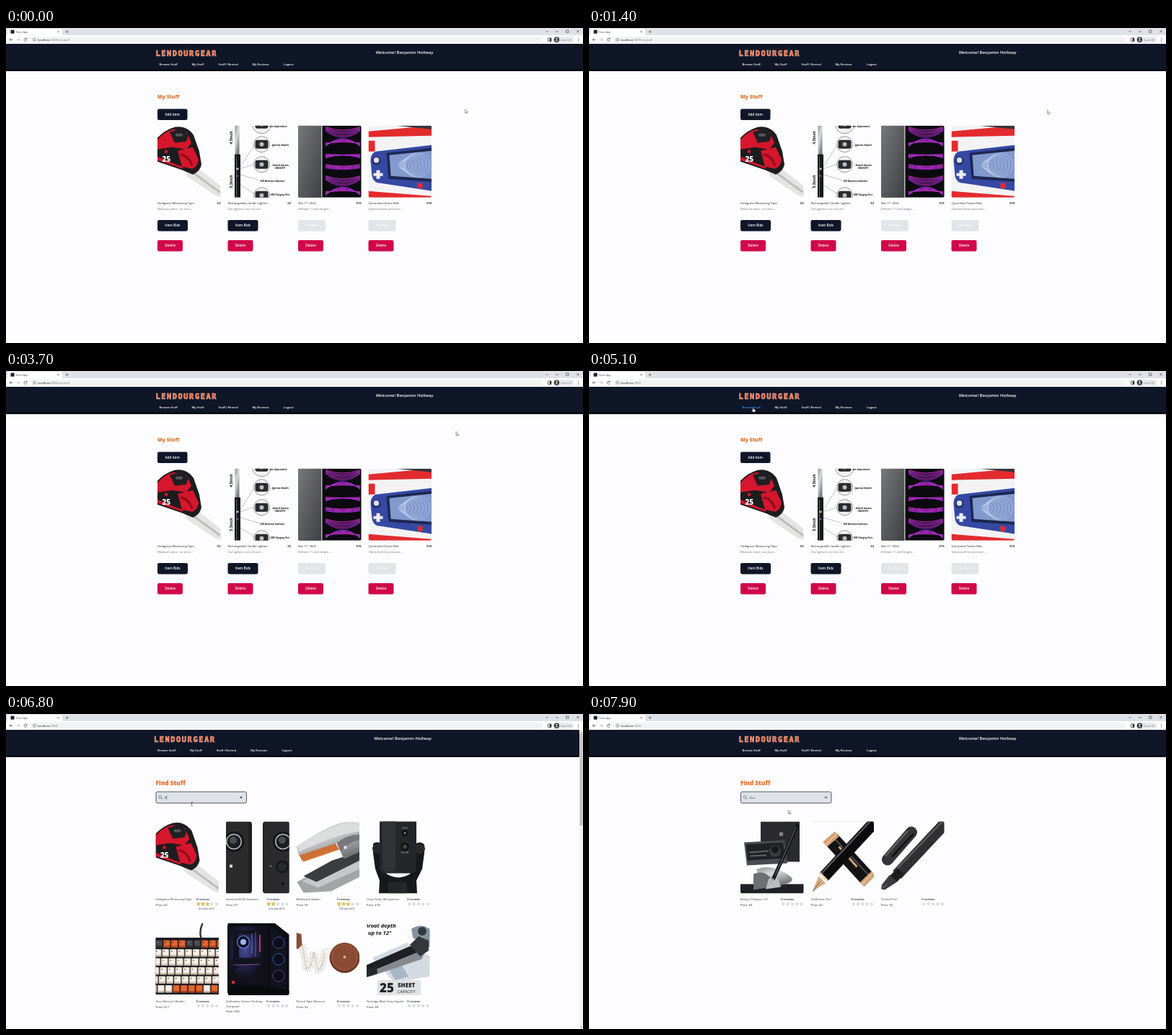
Recreate the animation shown at these times as an HTML page. Size 800 by 438 pixels, loop 8 s.

```html
<!DOCTYPE html>
<html lang="en">
<head>
<meta charset="utf-8">
<title>React App</title>
<style>
html, body { margin: 0; width: 100%; height: 100%; overflow: hidden; background: #fdfcfe; }
svg { display: block; width: 800px; height: 438px; font-family: 'Open Sans', 'Noto Sans', sans-serif; }
</style>
</head>
<body>
<svg viewBox="0 0 800 438">
  <defs>
    <clipPath id="card"><rect width="87.5" height="100" rx="2"/></clipPath>
    <linearGradient id="steel" x2="1" y2="1"><stop stop-color="#77787b"/><stop offset="1" stop-color="#3f4043"/></linearGradient>
    <linearGradient id="silver" x2=".6" y2="1"><stop stop-color="#8f9092"/><stop offset=".45" stop-color="#d9dadb"/><stop offset="1" stop-color="#77787a"/></linearGradient>
    <linearGradient id="skin" x2="1" y2="1"><stop stop-color="#f0c3a4"/><stop offset="1" stop-color="#c98e6e"/></linearGradient>
    <radialGradient id="glow" cx=".4" cy=".4"><stop stop-color="#4a4f9c"/><stop offset=".5" stop-color="#2a2350"/><stop offset="1" stop-color="#10111a"/></radialGradient>
  </defs>
  <g id="screen"></g>
  <g id="pointer"></g>
</svg>
<script>
const NAVY = '#0f1627', INK = '#1f2430', GREY = '#6b7280';
const $ = id => document.getElementById(id);
const range = (n, f) => Array.from({ length: n }, (_, i) => f(i)).join('');

// Shape helpers returning SVG markup
const rect = (x, y, w, h, fill, r = 0, more = '') =>
  `<rect x="${x}" y="${y}" width="${w}" height="${h}" rx="${r}" fill="${fill}" ${more}/>`;
const disc = (x, y, r, fill, more = '') => `<circle cx="${x}" cy="${y}" r="${r}" fill="${fill}" ${more}/>`;
const path = (d, fill, more = '') => `<path d="${d}" fill="${fill}" ${more}/>`;
const line = (d, color, w = 1, more = '') => path(d, 'none', `stroke="${color}" stroke-width="${w}" ${more}`);
const text = (x, y, s, size = 4.1, fill = INK, more = '') =>
  `<text x="${x}" y="${y}" font-size="${size}" fill="${fill}" ${more}>${s}</text>`;
const group = (x, y, s) => `<g transform="translate(${x} ${y})">${s}</g>`;
const SEMI = ' font-weight="600"', BOLD = ' font-weight="700"', HEAVY = ' font-weight="800"';
const MID = ' text-anchor="middle"', END = ' text-anchor="end"';
const ROUND = ' stroke-linecap="round"', ITALIC = BOLD + ' font-style="italic"';
const ring = (color, w) => `stroke="${color}" stroke-width="${w}"`;

// Product pictures, each 87.5 x 100
const art = {
  tape: path('M38 59L50 54 88 84V99L80 97 40 70Z', '#e4e4e2') + line('M46 63L87 93', '#555', 3, 'stroke-dasharray=".6 1.6"') +
    path('M0 17Q10 6 24 2Q40-1 50 13L58 36 61 54Q59 64 49 68L35 62 0 50Z', '#1d1c1f') +
    path('M0 20Q9 8 23 5L41 10 47 24 40 33 20 30 0 33Z', '#d5162c') + path('M28 35L49 30 57 47Q56 57 48 60L34 57Z', '#d5162c') +
    path('M0 43L26 54 35 57V60L0 48Z', '#d5162c') + path('M17 9L33 4 43 13 40 22 24 24Z', '#202024') + rect(25, 11, 10, 4, '#55555a', 2) +
    rect(10, 34, 4, 4, '#d5162c') + text(6.5, 50, '25', 10, '#fff', HEAVY) + line('M32 40Q44 42 48 56', '#8d0d1c', 3),
  lighter: rect(10, 0, 6, 41, 'url(#silver)') + rect(9.5, 40, 8, 60, '#17181b') + line('M12 43V100', '#777', .8) +
    disc(13.5, 60, 1.5, '#ccc') + disc(13.5, 70, 1, '#59f') +
    [[-2, 13], [26, 11], [54, 11], [97, 11]].map(([y, r]) => disc(47, y, r, '#f4f4f4', ring('#555', .6)) +
      rect(38, y - 6, 18, 12, '#2a2b2f', 3) + disc(47, y, 3, '#bbb')).join('') +
    line('M17 58L36 28M17 60L36 54M17 68L44 76M17 82L37 95', '#666', .4) +
    text(58, 2, 'Arc Adjustable', 3.5, '#111', ITALIC) + text(61, 28, 'Ignition Switch', 3.3, '#111', ITALIC) +
    text(62, 56, 'Switch button', 3.4, '#111', ITALIC) + text(65, 60.5, '(ON/OFF)', 3.4, '#111', ITALIC) +
    text(45, 78, 'LED Batteries Indicator', 3.1, '#111', ITALIC) + text(59, 97, 'USB Charging Port', 3.1, '#111', ITALIC) +
    text(0, 0, '4.5inch', 5.2, '#111', BOLD + ' transform="translate(6 26) rotate(-90)"') +
    text(0, 0, '5.3inch', 5.2, '#111', BOLD + ' transform="translate(6 87) rotate(-90)"'),
  tablet: rect(0, 0, 88, 100, '#0b0b0f') + rect(0, 0, 32, 100, 'url(#steel)') + rect(32, 0, 1.5, 100, '#b8b8ba') +
    [[5, 14], [27, -13], [43, -4], [57, 4], [73, 13], [95, -14]].map(([y, bend]) => range(6, i =>
      line(`M38 ${y + i - 3}Q62 ${y + bend * (.4 + i * .22)} 86 ${y + i - 3}`, ['#e22cc0', '#8b2bd6'][i % 2], .9))).join(''),
  console: rect(0, 0, 88, 100, '#f3f3f4') + path('M0 8L88 0V14L0 16Z', '#e32b2e') + path('M38 0H88V5Z', '#33353b') +
    rect(0, 21, 9, 15, '#e32b2e') + path('M0 91L88 98V100H0Z', '#e32b2e') +
    path('M10 36Q3 39 3 49L5 70Q7 80 17 80L88 91V27Z', '#3549a4') + path('M25 38L88 31V78L28 74Z', '#1d2751') +
    path('M29 41L88 35V74L31 70Z', '#8199cd') +
    range(8, i => disc(47 + i * 3, 55, 5 + i * 1.7, 'none', ring('#d2def3', .5))) +
    disc(11, 49, 6, '#25306e') + disc(11, 48, 3.7, '#dfe0e5') + path('M11 62H16V66H20V70H16V74H11V70H7V66H11Z', '#eee') + rect(68, 80, 7, 7, '#e32b2e'),
  speakers: [[-8, 44, 11], [51, 45, 79]].map(([x, w, c]) => rect(x, 0, w, 100, '#1f1f21', 4) + rect(x + 2, 1, w - 7, 98, '#2b2b2d', 4) +
      disc(c, 28, 14, '#141416') + disc(c, 28, 11, '#b9babc') + disc(c, 28, 9.5, '#1c1d20') + disc(c - 1, 26, 5, '#4d4e52')).join('') +
    disc(78, 63, 9, '#161719') + disc(78, 63, 6, '#2b2b2f') + rect(5, 60, 4, 4, '#ddd') + disc(79, 86, 2, '#111') + disc(62, 62, 1, '#aaa'),
  stapler: path('M1 84L46 60 88 48V77L48 97 10 99Z', '#a3a4a6') + path('M8 83L54 60 88 52V66L30 92Z', '#c6c7c8') +
    path('M10 76L50 54 88 42V54L28 84Z', '#3b3c3f') + path('M2 44L52 27 60 39 10 56Z', '#e07b3a') +
    line('M6 50L56 33', '#9d5230', 11, 'stroke-dasharray=".6 1.6"') +
    path('M0 35Q30 14 58 3Q76-2 88 2V42L66 52 56 30 4 47Z', 'url(#silver)') + path('M2 33Q30 15 60 4Q76 0 88 5V14Q60 16 4 42Z', '#dcdddd') +
    path('M56 30Q70 18 88 18V26Q72 28 62 42Z', '#77787a') + rect(66, 34, 4, 4, '#e5e5e5'),
  mic: path('M9 31Q15 26 21 32V62Q24 76 44 78Q64 76 67 62V32Q74 26 80 32V44L77 66 69 82 70 100H17L18 82 12 66 9 44Z', '#17181a') +
    disc(15, 38, 7, '#29292c') + disc(74, 38, 7, '#29292c') + rect(18, -6, 51, 78, '#252629', 7) + rect(22, -6, 18, 76, '#323337', 7) +
    disc(53, 16, 4, '#0d0e10') + disc(53, 16, 1.5, '#888') + disc(53, 35, 5.5, '#0d0e10') + disc(53, 35, 3, '#444') +
    text(53, 10, 'MUTE', 2.8, '#bbb', MID) + text(53, 44, 'VOLUME', 2.8, '#bbb', MID) + rect(30, 84, 26, 16, '#252629', 3),
  keyboard: line('M65 0Q60 11 63 21', '#303238', 2.4) + rect(-3, 20, 94, 79, '#1b1c21', 3) +
    range(6, r => range(9, c => {
      const x = c * 10.6 - r * 1.6, y = 23.5 + r * 12.5;
      const accent = r == 0 ? c % 5 > 0 && c % 5 < 4 : r == 5 && (c > 2 && c < 7 || c == 8);
      return rect(x, y, 9.6, 10.6, accent ? '#a5431f' : r == 0 ? '#2b2c31' : '#c9bcae', 1) +
        rect(x + 1, y + .5, 7.6, 7.6, accent ? '#e5662f' : r == 0 ? '#494a50' : '#f8f0e6', 1) +
        (r < 5 ? rect(x + 2, y + 2, 1.6, 2, accent ? '#6b2a12' : '#777', .4) : '');
    })),
  labeler: path('M10 0H77Q86 2 86 16L83 42 79 54 78 92Q77 100 67 100H20Q11 100 10 92L9 54 5 42 3 16Q3 2 10 0Z', '#1b1c1f') +
    rect(17, 3, 54, 24, '#0d0e10', 3) + rect(21, 6, 46, 18, '#b4b9ba', 1) +
    text(44, 18.5, 'AB120', 8, '#373c3f', MID + ' font-family="DejaVu Sans Mono, monospace"') + rect(9, 29, 9, 9, '#dfe6ee', 2) + rect(66, 29, 9, 9, '#dfe6ee', 2) +
    disc(13.5, 33.5, 2.2, '#3975ae') + disc(70.5, 33.5, 2.2, '#3975ae') + range(5, i => rect(21 + i * 9, 31, 6, 4, '#4b4e52', 2)) +
    range(5, i => rect(15 + i * 12, 46 + (i % 2) * 2, 9, 6, '#3a3d41', 3)) + disc(43, 50, 6, '#0c0c0e') +
    range(4, r => range(8, c => rect(12 + r + c * 7.7, 61 + r * 9, 6.6, 6.5, '#686b70', 1) + rect(12.5 + r + c * 7.7, 61.5 + r * 9, 5.6, 5.3, '#26282b', 1))),
  torch: rect(50, 0, 38, 28, '#101720') + path('M50 26L72 9 88 19V28Z', '#7892a0') + path('M58 17L72 5 84 16Z', '#dfe9ee', 'opacity=".8"') +
    path('M40 58L52 47 66 33 76 33 88 41V82L76 88 60 80Z', 'url(#skin)') + line('M20 23L72 82', '#1a1b1f', 13) +
    path('M2 18L20 2Q38 7 41 23L36 34 27 38Q12 36 2 18Z', '#212227') + path('M2 18L20 2 23 5 5 22Z', '#96989b') +
    line('M26 31L72 84', '#45474b', 2.4) + disc(36, 41, 3, '#b8bdc2') +
    line('M45 61L61 49M49 68L68 56M54 75L73 65', '#eebfa0', 7, ROUND) +
    line('M19 68Q37 63 45 78Q53 94 70 93', '#4e2a27', 2) + line('M3 71V91Q4 98 7 91V76M14 71V91Q15 98 18 91V74', '#222', 1.2) +
    rect(1, 69, 5, 9, '#222') + rect(12, 69, 5, 9, '#222'),
  pc: path('M3 0H68L88 16V97H2V4Z', '#0c0d11') + path('M5 4H58V86H5Z', 'url(#glow)') + path('M61 5L84 18V92L61 88Z', '#11131d') +
    path('M10 10H50L54 17 18 14V60L10 66Z', '#12131d') + disc(24, 26, 8.5, '#0d0f1b', ring('#5a8cf0', 1.2)) + disc(24, 26, 4, '#9fb4ee') +
    rect(9, 48, 38, 9, '#14141f') + line('M11 58L47 57M41 12V46', '#9c4aa6', .9) + line('M47 16V40', '#cf4589', 1.6) + line('M36 14V42', '#4a7be0', 1) +
    range(3, i => disc(73, 27 + i * 23, 8, '#0c0e1a', ring(['#5a4bb0', '#3b62b0', '#7e3a80'][i], .9))) +
    rect(8, 80, 4, 4, '#d22f3b') + path('M3 89H61L88 94V100H3Z', '#090a0d'),
  roundTape: line('M8 30L14 62Q21 65 24 40L30 65Q36 66 39 41Q49 36 58 49', '#c9c8c3', 9) + line('M8 30L14 62Q21 65 24 40L30 65Q36 66 39 41Q49 36 58 49', '#f4f2ec', 8) +
    line('M8 30L14 62Q21 65 24 40L30 65Q36 66 39 41', '#777', 3, 'stroke-dasharray=".5 2"') + path('M0 13L7 15 8 30 2 36 0 35Z', '#894d36') +
    disc(67, 48, 21, '#693522') + disc(67, 47, 19.5, '#8a4a34') + disc(67, 47, 17, 'none', ring('#a9694c', .6)) + disc(67, 47, 2, '#d1b287'),
  longStapler: path('M8 48L56 27 88 46V74L38 82Z', '#d3dae2') + path('M22 50L40 43 58 74 40 79Z', '#a9b6c6') +
    path('M62 8Q70 2 80 4L88 8V34L64 20Z', '#8792a0') + disc(77, 11, 6, '#333941') + text(14, 60, 'WALL', 9, '#f6f6f6', BOLD + ' transform="rotate(-14 14 60)"') +
    path('M0 64L62 38 80 42 76 50 8 73 0 74Z', '#85888d') + path('M0 58L60 32 72 34 71 40 8 66 0 67Z', '#1e2024') +
    path('M60 30L72 18 86 24V38L74 46Z', '#33363b') + path('M0 64L14 60 15 70 0 75Z', '#26282c') +
    text(-2, 6, 'hroat depth', 7.6, '#111', ITALIC) + text(2, 16, 'up to 12"', 7.6, '#111', ITALIC) +
    rect(15, 79, 60, 21, '#e1e2e3') + text(18, 96, '25', 17, '#222', HEAVY) + text(43, 88.5, 'SHEET', 8, '#222', HEAVY) + text(43, 97, 'CAPACITY', 5.5, '#222'),
  floatPen: rect(28, 0, 54, 56, '#2b2b2f') + rect(54, 15, 5, 5, '#85868a') + path('M5 29L61 26 65 58 9 61Z', '#4a4b50') + path('M8 32L59 29 62 51 10 54Z', '#202124') +
    disc(48, 41, 8, '#3a3b40') + disc(48, 39, 5, '#17181a') + line('M12 43L39 41M13 48L36 47', '#606166', 2) + rect(0, 87, 88, 13, '#202125') +
    path('M22 67Q42 57 69 76Q78 84 58 88Q28 83 22 67Z', 'url(#silver)') + path('M18 73Q33 66 43 80L58 89 18 95Z', '#6d6f73') + path('M39 80L50 73 56 91 35 94Z', '#bbbcc0') +
    line('M79 5L46 79', '#17181b', 5, ROUND) + line('M77 8L48 75', '#717277', 1) + line('M46 79L42 86', '#aaa', 2),
  goldPen: line('M0 0H88', '#ddd') + line('M28 24L80 81', '#131315', 22) + line('M33 24L80 74', '#4b4a4b', 2) + line('M25 21L31 28M76 77L82 83', '#d2a177', 22) +
    line('M28 24L29 25M78 79L79 80', '#f2d7b8', 22, 'opacity=".7"') + line('M39 35L64 63', '#cfa078', 3) + line('M18 77L92 -3', '#0c0c0f', 16) + line('M15 72L86 -4', '#5d5d60', 2) +
    path('M11 76L21 86 12 91 2 98 6 88Z', '#d7ac82') + line('M13 83L3 97', '#78553d', 1) + line('M17 78L19 76', '#efd0a9', 16),
  blackPen: line('M9 53L42 15', '#353538', 16, ROUND) + line('M6 48L37 13', '#626267', 2) + line('M15 49L45 17', '#151518', 3) +
    line('M22 74L92 -1', '#303033', 16) + line('M18 70L86 -1', '#5e5e63', 2) + line('M17 80L27 69', '#1c1c1f', 13) + path('M12 74L22 84 5 95 0 94 1 88Z', '#3c3c40') + line('M1 94L8 87', '#777', 1)
};

// name lines, price, reviews, rating
const items = {
  tape: [['Holdgrave Measuring Tape'], 2, 4, '3.0'], speakers: [['Vandoral K240 Speakers'], 7, 3, '2.6'],
  stapler: [['Marlowick Stapler'], 5, 5, '3.8'], mic: [['Gray Ombu Microphone'], 18, 0], keyboard: [['Tavu Morisa E-Reader'], 17, 0],
  labeler: [['Felb Label Maker'], 13, 0], torch: [['Rechargeable LED Flashlight,', '90,000 Lumens'], 8, 0],
  pc: [['Voltharbor Gamer Desktop', 'Computer'], 20, 0], roundTape: [['Round Tape Measure'], 2, 0],
  longStapler: [['Farlodge Black Gray Stapler'], 8, 0], floatPen: [['Belquo Floatpen 3.0'], 4, 0],
  goldPen: [['Quillhaven Pen'], 2, 0], blackPen: [['Ombrel Pen'], 2, 0]
};
const results = {
  '': 'tape speakers stapler mic keyboard labeler torch pc',
  P: 'tape speakers stapler mic keyboard pc roundTape longStapler',
  Pe: 'tape speakers roundTape floatPen goldPen blackPen',
  Pen: 'floatPen goldPen blackPen'
};
const thumbs = { '': 91, P: 128, Pe: 250 };
const owned = [
  ['tape', 'Holdgrave Measuring Tape', 2, 'Measure twice, cut once...', true],
  ['lighter', 'Rechargeable Candle Lighten', 2, 'Our lighters can not onl...', true],
  ['tablet', 'Slat 11" 2022', 15, 'Brilliant 11-inch bright ...', false],
  ['console', 'Quorimbo Pocket Mini', 18, 'Optimized for personal, ...', false]
];

const photo = name => `<g clip-path="url(#card)">${art[name]}</g>`;
const button = (y, w, label, fill, color = '#fff') =>
  rect(0, y, w, 15.5, fill, 2.3) + text(w / 2, y + 9.5, label, 4.7, color, SEMI + MID);
const star = x => 'M' + Array.from({ length: 10 }, (_, k) => {
  const a = k * Math.PI / 5, r = k % 2 ? 1.3 : 3;
  return `${(x + r * Math.sin(a)).toFixed(2)} ${(114.7 - r * Math.cos(a)).toFixed(2)}`;
}).join('L') + 'Z';

function browser(url) {
  return rect(0, 0, 800, 10.5, '#dee1e6') + rect(2, 1.2, 76, 12, '#fff', 2.5) + rect(0, 10, 800, 12.6, '#fff') +
    rect(6.5, 2.7, 5, 5, '#20232a') + text(13.5, 6.7, 'React App', 3.6, '#4a4d50') +
    line('M71.3 4L73.7 6.4M73.7 4L71.3 6.4M84.5 3.2V7.2M82.5 5.2H86.5', '#444', .6) +
    line('M748.5 4L750 5.5 751.5 4M762 5H766M776.7 3H780V6.3H776.7ZM791.3 3L794.7 6.4M794.7 3L791.3 6.4', '#333', .6) +
    rect(33, 11.7, 711, 9, '#f1f3f4', 4.5) + line('M9.5 16.2H5M7 14.2L5 16.2 7 18.2M28.7 15A2 2 0 1 0 29 17M29 13.8V15.5H27.3', '#444', .7) +
    line('M14.5 16.2H19M17 14.2L19 16.2 17 18.2', '#aaa', .7) + disc(39.5, 16.2, 2, 'none', ring('#555', .5)) + line('M39.5 15.8V17.5M39.5 14.8V15.3', '#555', .5) +
    text(44, 17.7, `localhost<tspan fill="#74777b">:3000${url}</tspan>`, 4.15, '#202124') +
    rect(751.5, 14, 4.5, 4.5, 'none', .4, ring('#333', .7)) + rect(753.7, 14, 2.3, 4.5, '#333') +
    rect(758.5, 11.7, 29, 9, '#e8eaed', 4.5) + disc(763.5, 16.2, 3.7, '#33363a') + disc(763.5, 15, 1.2, '#eee') + path('M761.3 18.2Q763.5 15.8 765.7 18.2Z', '#eee') +
    text(769, 17.5, 'Guest (2)', 3.6, '#777') + range(3, i => disc(793.5, 14.4 + i * 1.8, .5, '#333'));
}

function header(hover) {
  const links = [[212.5, 'Browse Stuff'], [257.5, 'My Stuff'], [294.5, 'Stuff I Rented'], [341.5, 'My Reviews'], [385, 'Logout']];
  return text(207.5, 39.3, 'LENDOURGEAR', 10.3, '#f05a35', `${BOLD} letter-spacing="1.57" font-family="DejaVu Sans Mono, monospace" stroke="#ffc6aa" stroke-width=".55"`) +
    text(592.5, 36, 'Welcome! Benjamin Hollway', 5.85, '#fff', SEMI + END) +
    links.map(([x, s], i) => text(x, 52.4, s, 4.15, hover && !i ? '#2d93ef' : '#fff', SEMI)).join('');
}

function myPage() {
  return text(210, 98.2, 'My Stuff', 6.9, '#e07228', HEAVY) + group(210, 0, button(112.5, 41.5, 'Add item', NAVY)) +
    owned.map(([pic, name, price, about, bids], i) => group(210 + i * 97.5, 135.7, photo(pic) +
      text(0, 109.8, name) + text(87.5, 109.8, '$' + price, 4.1, INK, BOLD + END) + text(0, 117.4, about, 4.1, GREY) +
      (bids ? button(131.2, 42, 'Item Bids', NAVY) : button(131.2, 38, 'No Bids', '#e2e4e7', '#f8f8f9')) +
      button(159.3, 35, 'Delete', '#d00749'))).join('');
}

function product(key, i) {
  const [lines, price, reviews, rating] = items[key], gold = Math.floor(rating || 0);
  return group(210 + i % 4 * 97.5, 149.5 + (i >> 2) * 141.5, photo(key) +
    lines.map((s, k) => text(0, 109.9 + k * 6.6, s, 4.05, '#3b4049')).join('') +
    text(0, 117.5 + (lines.length - 1) * 6.8, 'Price: $' + price) +
    text(56.3, 109.9, reviews + ' reviews', 4, INK, SEMI) +
    range(5, k => path(star(59.3 + k * 6.3), k < gold ? '#efc83d' : '#d2d5d9', k < gold ? ring('#a78422', .3) : '')) +
    (rating ? text(70, 122.3, rating + ' out of 5', 4.1, INK, MID) : ''));
}

function findPage(query, focus, caret) {
  const x = 222.6 + [0, 2.5, 4.8, 7.4][query.length];
  return text(210, 99.3, 'Find Stuff', 8.3, '#ee6a22', HEAVY) +
    rect(210.5, 108.1, 125.5, 15.8, '#dee2e6', 2.2, focus ? ring('#39414e', .85) : ring('#dee2e6', 1)) +
    disc(216.2, 115.5, 1.9, 'none', ring('#4b5563', .6)) + line('M217.6 116.9L219.4 118.7', '#4b5563', .7) +
    text(222.6, 117.6, query || 'Search for stuff', 4.15, query ? '#252a34' : '#9a9fa6') +
    (caret ? line(`M${x} 113.8V118.6`, '#111', .5) : '') +
    (query ? line('M327.3 114.8L329.7 117.2M329.7 114.8L327.3 117.2', '#222', .9) : '') +
    results[query].split(' ').map(product).join('');
}

// Pointer stops: time, x, y
const stops = [[0, 636.6, 113], [1000, 636.6, 113], [1400, 635.6, 114], [1800, 624, 84.3], [3700, 624, 84.3], [4500, 227, 51],
  [5200, 227, 51], [5600, 257, 124], [6300, 257, 124], [6700, 257.6, 125], [7300, 257.6, 125], [7800, 276.3, 133.5], [8000, 276.3, 133.5]];
function pointerAt(t) {
  const i = stops.findIndex(s => s[0] > t), [a, ax, ay] = stops[i - 1], [b, bx, by] = stops[i];
  const k = (t - a) / (b - a), e = k * k * (3 - 2 * k);
  return [ax + (bx - ax) * e, ay + (by - ay) * e];
}
const shapes = {
  arrow: path('M0 0V5.2L1.2 4.1 2.1 6 3 5.6 2.2 3.8H3.7Z', '#fff', ring('#333', .45)),
  hand: path('M0 0Q.9-.6 1.1.4V2.1L3.5 2.7Q4 3 3.7 4.4L3 6H.2L-1.6 3.6Q-1.3 2.8 0 3.7Z', '#fff', ring('#222', .4)),
  beam: line('M-1.2-2.5Q0-2.5 0-2V2.2Q0 2.6-1.2 2.6M1.2-2.5Q0-2.5 0-2M0 2.2Q0 2.6 1.2 2.6', '#333', .6)
};

let drawn = '';
function draw() {
  const t = performance.now() % 8000;
  const [x, y] = pointerAt(t), finding = t >= 5300;
  const query = t < 6700 ? '' : t < 7000 ? 'P' : t < 7200 ? 'Pe' : 'Pen';
  const focus = t >= 6000, typedAt = { '': 6000, P: 6700, Pe: 7000, Pen: 7200 }[query];
  const caret = focus && (t - typedAt) % 1000 < 500;
  const hover = y > 46 && y < 54 && x < 240, url = t < 5000 ? '/mystuff' : '';
  const key = [finding, query, focus, caret, hover, url].join();
  if (key != drawn) {
    drawn = key;
    const thumb = finding && thumbs[query];
    $('screen').innerHTML = rect(0, 0, 800, 438, '#fdfcfe') + browser(url) + rect(0, 22, 800, 38, NAVY) + rect(0, 57, 800, 3, '#080c17') +
      group(thumb ? -2.5 : 0, 0, header(hover) + (finding ? findPage(query, focus, caret) : myPage())) +
      (thumb ? rect(795, 22, 5, 416, '#f1f1f1') + rect(795.5, 27, 4, thumb, '#c1c1c1') +
        path('M796.3 25.7L797.5 24.3 798.7 25.7ZM796.3 434.5L797.5 436 798.7 434.5Z', '#666') : '');
  }
  const inField = finding && y > 107 && y < 125.5 && x < 334;
  $('pointer').innerHTML = group(x, y, shapes[hover ? 'hand' : inField ? 'beam' : 'arrow']);
  requestAnimationFrame(draw);
}
draw();
</script>
</body>
</html>
```
